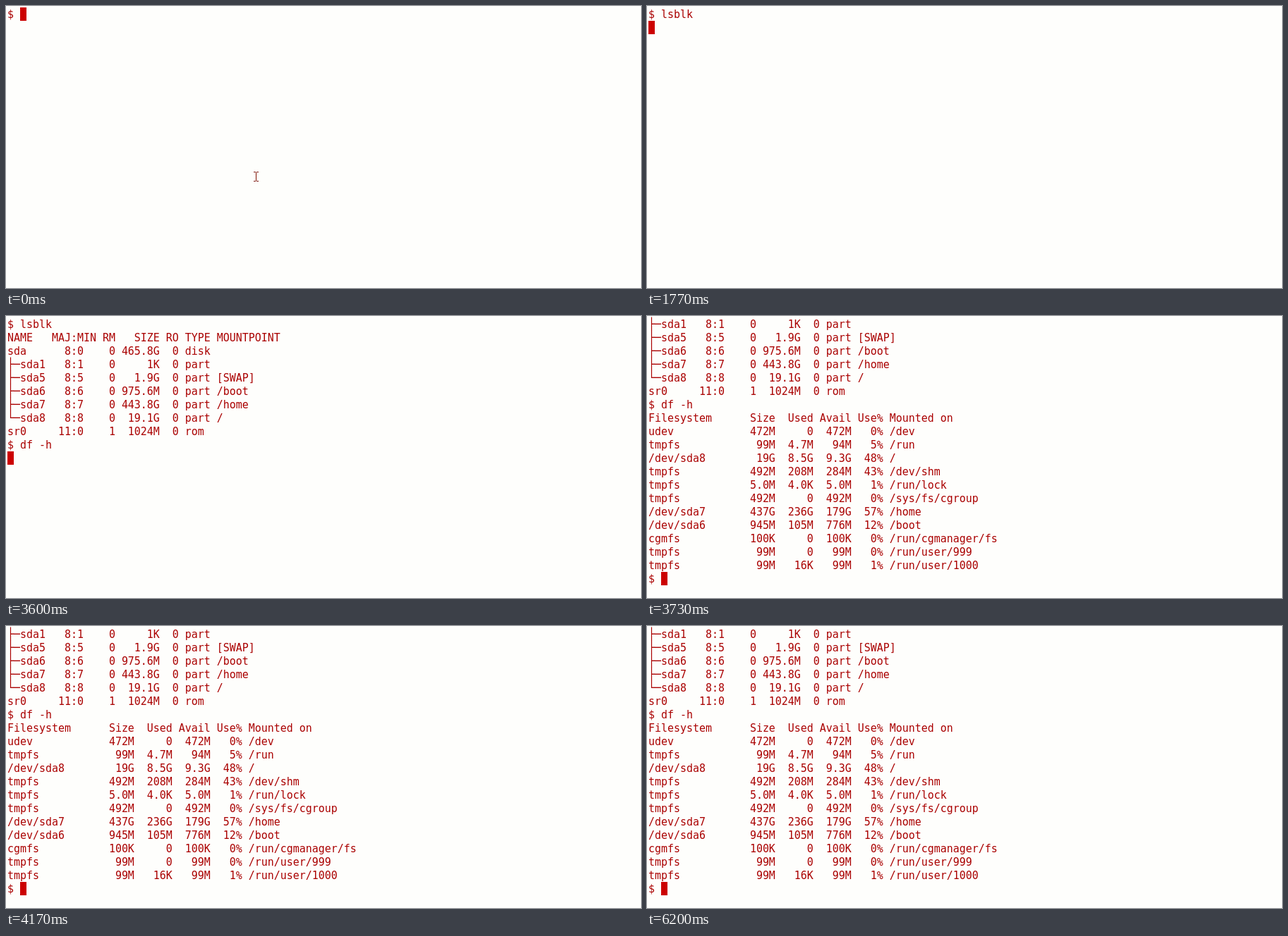
An HTML page for the animation above (6260 ms loop, 900x400 px).

```html
<!DOCTYPE html>
<html lang="en">
<head>
<meta charset="utf-8">
<title>Terminal: lsblk and df</title>
<style>
  html, body { margin: 0; width: 100%; height: 100%; overflow: hidden; background: #fefefc; }
  #stage { position: relative; width: 900px; height: 400px; overflow: hidden; }
  /* The font size gives a cell 9px wide. */
  #screen {
    position: absolute; left: 2px; top: 3px;
    font: 14.95px/18px "DejaVu Sans Mono", monospace;
    font-variant-ligatures: none; color: #aa0000; white-space: pre;
  }
  /* Tall terminal letters, grown from the baseline. */
  #screen div { height: 18px; margin-bottom: 1px; transform: scaleY(1.1); transform-origin: 0 14px; }
  #cursor { position: absolute; width: 9px; height: 19px; background: #cc0000; }
  #pointer { position: absolute; left: 351px; top: 235px; fill: none; stroke: #801000; }
</style>
</head>
<body>
<div id="stage">
  <div id="screen"></div>
  <div id="cursor"></div>
  <svg id="pointer" width="7" height="14" shape-rendering="crispEdges">
    <path d="M0 .5H3M4 .5H7M3.5 1V13M0 13.5H3M4 13.5H7"/>
  </svg>
</div>
<script>
const LOOP = 6260, ROWS = 20, CELL_W = 9, CELL_H = 19, PAD = 2;

const LSBLK = `
NAME   MAJ:MIN RM   SIZE RO TYPE MOUNTPOINT
sda      8:0    0 465.8G  0 disk
├─sda1   8:1    0     1K  0 part
├─sda5   8:5    0   1.9G  0 part [SWAP]
├─sda6   8:6    0 975.6M  0 part /boot
├─sda7   8:7    0 443.8G  0 part /home
└─sda8   8:8    0  19.1G  0 part /
sr0     11:0    1  1024M  0 rom
`;

const DF = `
Filesystem      Size  Used Avail Use% Mounted on
udev            472M     0  472M   0% /dev
tmpfs            99M  4.7M   94M   5% /run
/dev/sda8        19G  8.5G  9.3G  48% /
tmpfs           492M  208M  284M  43% /dev/shm
tmpfs           5.0M  4.0K  5.0M   1% /run/lock
tmpfs           492M     0  492M   0% /sys/fs/cgroup
/dev/sda7       437G  236G  179G  57% /home
/dev/sda6       945M  105M  776M  12% /boot
cgmfs           100K     0  100K   0% /run/cgmanager/fs
tmpfs            99M     0   99M   0% /run/user/999
tmpfs            99M   16K   99M   1% /run/user/1000
`;

// Times in ms of each key press, of Enter and of the printed result.
const commands = [
  { text: "lsblk", keys: [770, 900, 1070, 1230, 1400], enter: 1600, done: 2000, output: LSBLK },
  { text: "df -h", keys: [2670, 2800, 2970, 3170, 3370], enter: 3570, done: 3630, output: DF }
];

const [screenEl, cursorEl, pointerEl] =
  ["screen", "cursor", "pointer"].map(id => document.getElementById(id));

function screenText(t) {
  let text = "$ ";
  for (const { text: command, keys, enter, done, output } of commands) {
    text += command.slice(0, keys.filter(k => t >= k).length);
    if (t < enter) break;
    if (t < done) { text += "\n"; break; }
    text += output + "$ ";
  }
  return text;
}

function makeRow(line) {
  const row = document.createElement("div");
  row.textContent = line;
  return row;
}

let shown = null;

function draw(now) {
  const t = now % LOOP;
  const text = screenText(t);
  if (text !== shown) {
    const lines = text.split("\n").slice(-ROWS);
    const last = lines.length - 1;
    screenEl.replaceChildren(...lines.map(makeRow));
    cursorEl.style.left = PAD + lines[last].length * CELL_W + "px";
    cursorEl.style.top = PAD + last * CELL_H + "px";
    shown = text;
  }
  pointerEl.style.visibility = t < commands[0].keys[0] ? "visible" : "hidden";
}

const start = performance.now();
function tick() {
  draw(performance.now() - start);
  requestAnimationFrame(tick);
}
tick();
</script>
</body>
</html>
```
